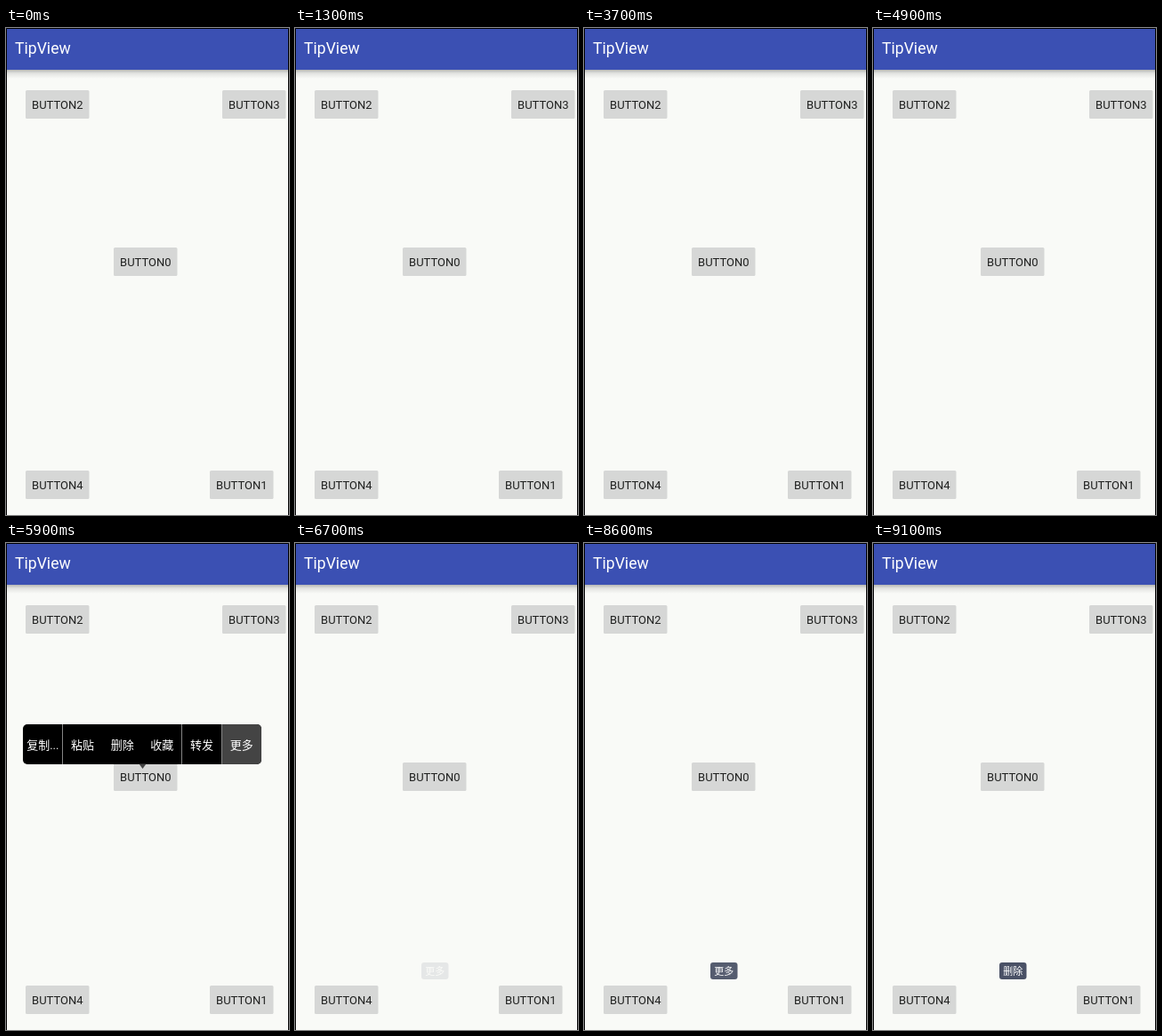
An HTML page that plays this animation: 318x548 px, repeating every 9.9 s.

```html
<!DOCTYPE html>
<html lang="zh-CN">
<head>
<meta charset="utf-8">
<title>TipView</title>
<style>
  html, body { margin: 0; width: 100%; height: 100%; overflow: hidden; background: #f9faf7; }
  svg { display: block; width: 318px; height: 548px; }
  text { font: 13px Roboto, "Noto Sans CJK SC", "Noto Sans CJK", sans-serif; }
  .mid { text-anchor: middle; }
  #buttons rect { fill: #d6d7d6; }
  #buttons text { fill: #202120; }
  #overlay text { fill: #fff; }
  #overlay .toast { font-size: 11px; }
</style>
</head>
<body>
<svg viewBox="0 0 318 548">
  <defs>
    <linearGradient id="shade" x2="0" y2="1">
      <stop stop-color="#000" stop-opacity=".27"/>
      <stop offset=".4" stop-color="#000" stop-opacity=".09"/>
      <stop offset="1" stop-color="#000" stop-opacity="0"/>
    </linearGradient>
    <clipPath id="round"><rect width="268" height="45" rx="5"/></clipPath>
  </defs>
  <rect width="318" height="548" fill="#f9faf7"/>
  <rect y="47" width="318" height="10" fill="url(#shade)"/>
  <rect width="318" height="47" fill="#3b50b3"/>
  <text x="10" y="29" fill="#fff" style="font-size:17.6px">TipView</text>
  <g id="buttons"></g>
  <path d="M.5 548V.5H317.5V548" fill="none" stroke="#000"/>
  <g id="overlay"></g>
</svg>
<script>
const LOOP = 9900, FRAME = 100;
const labels = ['复制...', '粘贴', '删除', '收藏', '转发', '更多'];
const itemW = 268 / labels.length;

// Button corners, indexed by the number in the label
const buttons = [[121, 247], [229, 498], [22, 70], [243, 70], [22, 498]];

// Popup: visible span, corner, arrow x, arrow on top, pressed item and its time
const tips = [
  { from: 100, to: 1300, x: 1, y: 108, arrow: 57, up: true },
  { from: 1900, to: 2700, x: 45.5, y: 87, arrow: 279, up: true },
  { from: 3100, to: 3700, x: 45.5, y: 463, arrow: 265 },
  { from: 4300, to: 4900, x: 1, y: 458, arrow: 57 },
  { from: 5400, to: 6700, x: 19, y: 204, arrow: 153.5, item: 5, press: 5900 },
  { from: 7600, to: 8600, x: 34, y: 215, arrow: 168, item: 2, press: 8000 },
];

const $ = id => document.getElementById(id);
const clamp = v => Math.max(0, Math.min(1, v));

$('buttons').innerHTML = buttons.map(([x, y], i) =>
  `<rect x="${x}" y="${y}" width="71.5" height="32" rx="1.5"/>
   <text class="mid" x="${x + 35.8}" y="${y + 21.3}">BUTTON${i}</text>`).join('');

function drawTip(tip, t) {
  const pressed = t >= tip.press;
  const [base, tipY] = tip.up ? [0.5, -5] : [44.5, 50];
  const ax = tip.arrow - tip.x;
  const press = pressed
    ? `<rect x="${tip.item * itemW}" width="${itemW}" height="45" fill="#444" clip-path="url(#round)"/>` : '';
  const lines = [1, 4, 5].map(i =>
    `<path d="M${Math.floor(i * itemW) + 0.5} 0V45" stroke="#858585"/>`).join('');
  const texts = labels.map((s, i) =>
    `<text class="mid" x="${(i + 0.5) * itemW}" y="28">${s}</text>`).join('');
  return `<g transform="translate(${tip.x} ${tip.y + (tip.up ? 5 : 0)})">
    <rect width="268" height="45" rx="5"/>
    <path d="M${ax - 4} ${base}h8L${ax} ${tipY}z" fill="${pressed ? '#444' : '#000'}"/>
    ${press}${lines}${texts}</g>`;
}

function drawToast(label, alpha) {
  return alpha <= 0 ? '' : `<g opacity="${alpha}">
    <rect x="142" y="472" width="30.5" height="19" rx="3" fill="#4a5166"/>
    <text class="mid toast" x="157.2" y="485.6">${label}</text></g>`;
}

// Toast opacity, eased in over half a second
function fade(t, start, length) {
  if (t < start) return 0;
  const k = clamp((t - start + FRAME) / length);
  return k * k * (3 - 2 * k);
}

let last = -1;
function tick() {
  const t = Math.floor(performance.now() % LOOP / FRAME) * FRAME;
  if (t !== last) {
    last = t;
    const more = fade(t, 6700, 500), del = fade(t, 8600, 600);
    const tip = tips.find(p => t >= p.from && t < p.to);
    $('overlay').innerHTML = drawToast('更多', more * (1 - del)) +
      drawToast('删除', del) + (tip ? drawTip(tip, t) : '');
  }
  requestAnimationFrame(tick);
}
tick();
</script>
</body>
</html>
```
